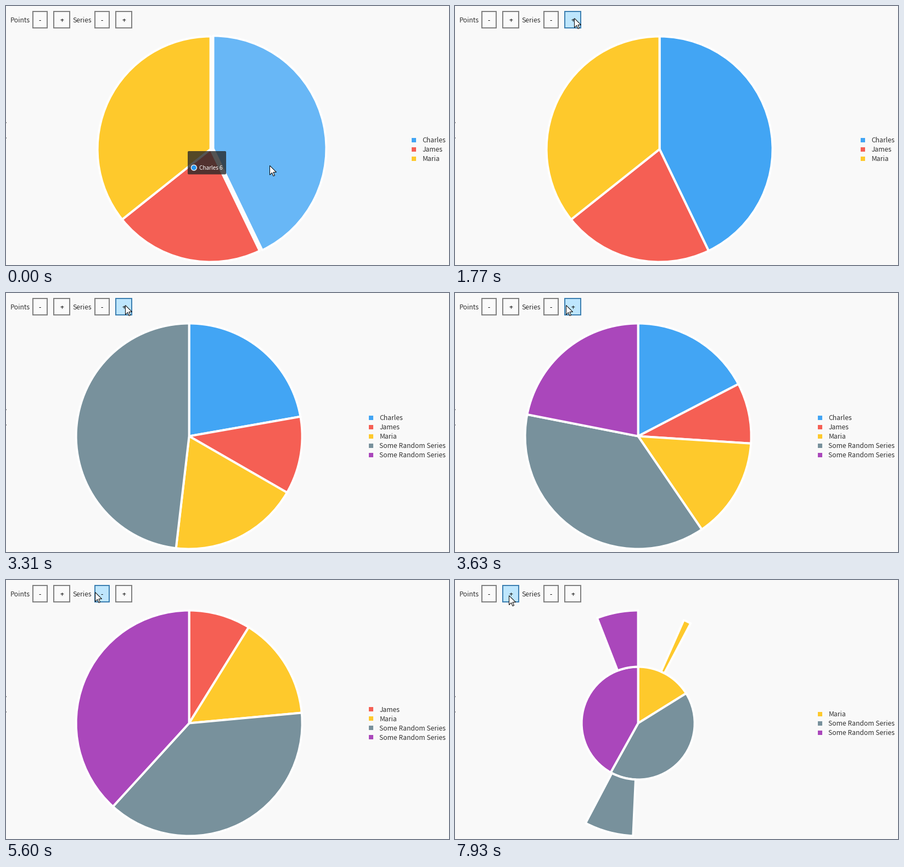
Animation of 807 by 473 pixels, one loop 8 s. Source, as a matplotlib script:

```python
import numpy as np
import matplotlib.pyplot as plt
from matplotlib.animation import FuncAnimation
from matplotlib.colors import to_rgb
from matplotlib.patches import Circle, FancyBboxPatch, Polygon, Rectangle, Wedge

W, H, DPI = 807, 473, 100
PX = 72 / DPI
STEP, LOOP = 20, 8000
CY, RADIUS, PUSH = 261.5, 206, 5

plt.rcParams["font.family"] = "Noto Sans CJK JP"
fig = plt.figure(figsize=(W / DPI, H / DPI), dpi=DPI, facecolor="#f9f9f9")
ax = fig.add_axes([0, 0, 1, 1])
ax.set_xlim(0, W)
ax.set_ylim(H, 0)
ax.axis("off")


def lighten(color, amount):
    return tuple(c + (1 - c) * amount for c in color)


NAMES = ["Charles", "James", "Maria"] + 2 * ["Some Random Series"]
VALUES = np.array([6, 3, 5, 13, 13])
SECOND_POINTS = np.array([0, 0, 2, 13, 11])
COLORS = [lighten(to_rgb(c), 0.15) for c in ("#2195f2", "#f34336", "#fec007", "#607d8a", "#9b27af")]

# When the chart answers each click.
EVENTS = [(1890, "add"), (3310, "add"), (4710, "drop"), (5690, "drop"), (7840, "split")]
LAG, ANIM_MS = 30, 430
PRESS_FROM, PRESS_TO = 340, 160
HIDE_TIP = 1510

# Pointer: resting place, then (start, end, x, y) of each move.
REST = (480, 291)
MOVES = [(430, 820, 236, 36), (1080, 1190, 217, 22), (3380, 4100, 162, 22),
         (6400, 6850, 62, 26), (7010, 7260, 98, 28)]
ARROW = np.array([(0, 0), (0, 17), (4, 13), (6.5, 19), (9, 18), (6.5, 12), (12, 12)]) + 0.5


def ramp(t, start, length):
    return min(max((t - start) / length, 0), 1)


def smooth(p):
    return p * p * (3 - 2 * p)


def label(x, y, text, size=12.1, color="#333333", **kw):
    return ax.text(x, y, text, fontsize=size * PX, color=color, va="baseline", **kw)


def make_button(x, width, symbol):
    box = ax.add_patch(Rectangle((x + 1, 10), width - 2, 30, lw=2 * PX, joinstyle="miter"))
    label(x + width / 2, 30, symbol, color="black", ha="center")
    return box, x, x + width


def make_slice(color):
    return ax.add_patch(Wedge((0, CY), RADIUS, 0, 1, facecolor=color, edgecolor="white",
                              lw=4 * PX, joinstyle="round"))


for y in (212, 240):
    ax.add_patch(Rectangle((0, y), 1.2, 2, color="#777777", lw=0))

buttons = []
for caption, text_x, x in (("Points", 7.5, 48), ("Series", 121.5, 161)):
    label(text_x, 30, caption)
    buttons += [make_button(x, 28, "-"), make_button(x + 38, 31, "+")]

inner = [make_slice(c) for c in COLORS]
outer = [make_slice(c) for c in COLORS]
swatches = [ax.add_patch(Rectangle((0, 0), 8, 8, color=c, lw=0)) for c in COLORS]
captions = [label(0, 0, n) for n in NAMES]

tip_box = ax.add_patch(FancyBboxPatch((333, 267), 66, 38.5, boxstyle="round,pad=2,rounding_size=2",
                                      facecolor=(0.15, 0.15, 0.15, 0.79), lw=0, zorder=4))
tip_dot = ax.add_patch(Circle((342.3, 295.3), 5, edgecolor="white", lw=1.2 * PX, zorder=5))
tip_text = label(351.5, 299, "", size=10, color="white", zorder=5)
cursor = ax.add_patch(Polygon(ARROW, facecolor="white", edgecolor="black", lw=PX,
                              joinstyle="miter", zorder=9))


def active_values(count):
    """Series values after the first `count` events; zero where a series is absent."""
    actions = [action for _, action in EVENTS[:count]]
    first, last = actions.count("drop"), 3 + actions.count("add")
    index = np.arange(len(VALUES))
    return np.where((index >= first) & (index < last), VALUES, 0)


def layout(values):
    wedges = 360 * values / values.sum()
    return np.cumsum(wedges) - wedges, wedges


def pointer_at(t):
    pos = np.array(REST, float)
    for start, end, *goal in MOVES:
        pos += (np.array(goal) - pos) * smooth(ramp(t, start, end - start))
    return pos


def hovered_series(pos, center, starts):
    dx, dy = pos - center
    if np.hypot(dx, dy) > RADIUS:
        return None
    angle = np.degrees(np.arctan2(dx, -dy)) % 360
    return np.searchsorted(starts, angle, side="right") - 1


def place(patch, cx, start, wedge, r, width=None, push=0):
    patch.set_visible(wedge > 0.05)
    mid = np.radians(start + wedge / 2)
    patch.set_center((cx + push * np.sin(mid), CY - push * np.cos(mid)))
    patch.set_radius(r)
    patch.set_width(width)
    patch.set_theta1(start - 90)
    patch.set_theta2(start + wedge - 90)


def draw_pie(t, count, pos, cx):
    values = active_values(count)
    starts, wedges = layout(values)
    p = 1
    if count:
        p = ramp(t, EVENTS[count - 1][0] + LAG, ANIM_MS)
        old_starts, old_wedges = layout(active_values(count - 1))
        starts = old_starts + (starts - old_starts) * p
        wedges = old_wedges + (wedges - old_wedges) * p

    split = count == len(EVENTS)
    hovered = hovered_series(pos, (cx, CY), starts[:3]) if count == 0 else None
    push = PUSH * (1 - ramp(t, 600, 150))
    for i, patch in enumerate(inner):
        place(patch, cx, starts[i], wedges[i] if values[i] else 0,
              RADIUS / 2 if split else RADIUS, push=0 if i else push)
        patch.set_facecolor(lighten(COLORS[i], 0.2) if i == hovered else COLORS[i])

    # New slices keep their end fixed and open backwards.
    for patch, start, wedge in zip(outer, *layout(SECOND_POINTS)):
        place(patch, cx, start + wedge * (1 - p), wedge * p if split else 0, RADIUS, RADIUS / 2)


def draw_legend(count):
    shown = active_values(count) > 0
    x = 661 if count else 739
    y = 261.9 - 8.5 * (shown.sum() - 1)
    for swatch, caption, visible in zip(swatches, captions, shown):
        swatch.set_visible(visible)
        caption.set_visible(visible)
        if visible:
            swatch.set_xy((x, round(y - 4)))
            caption.set_position((x + 19.5, round(y + 4.5)))
            y += 17


def draw_tooltip(t, pos, cx):
    i = 0 if pos[0] > cx else 2
    tip_text.set_text(f"{NAMES[i]} {VALUES[i]}")
    tip_dot.set_facecolor(lighten(COLORS[i], -0.15))
    tip_box.set_width(59 if i else 66)
    for artist in (tip_box, tip_dot, tip_text):
        artist.set_visible(t < HIDE_TIP)


def draw_buttons(t, pos):
    pressed = any(e - PRESS_FROM <= t < e - PRESS_TO for e, _ in EVENTS)
    for box, left, right in buttons:
        face, edge = "#fafafa", "#808080"
        if left + 0.5 < pos[0] < right and 9 <= pos[1] <= 41:
            face, edge = ("#c4e5f6", "#2c628b") if pressed else ("#bee6fd", "#3c7fb1")
        box.set_facecolor(face)
        box.set_edgecolor(edge)


def update(frame):
    t = frame * STEP + STEP / 2
    count = sum(t >= e for e, _ in EVENTS)
    cx = 333.6 if count else 372.6
    pos = pointer_at(t)
    draw_pie(t, count, pos, cx)
    draw_legend(count)
    draw_tooltip(t, pos, cx)
    draw_buttons(t, pos)
    cursor.set_xy(ARROW + np.round(pos))
    return []


anim = FuncAnimation(fig, update, frames=LOOP // STEP, interval=STEP,
                     init_func=lambda: update(0), repeat=True, repeat_delay=0, blit=False)
plt.show()
```
